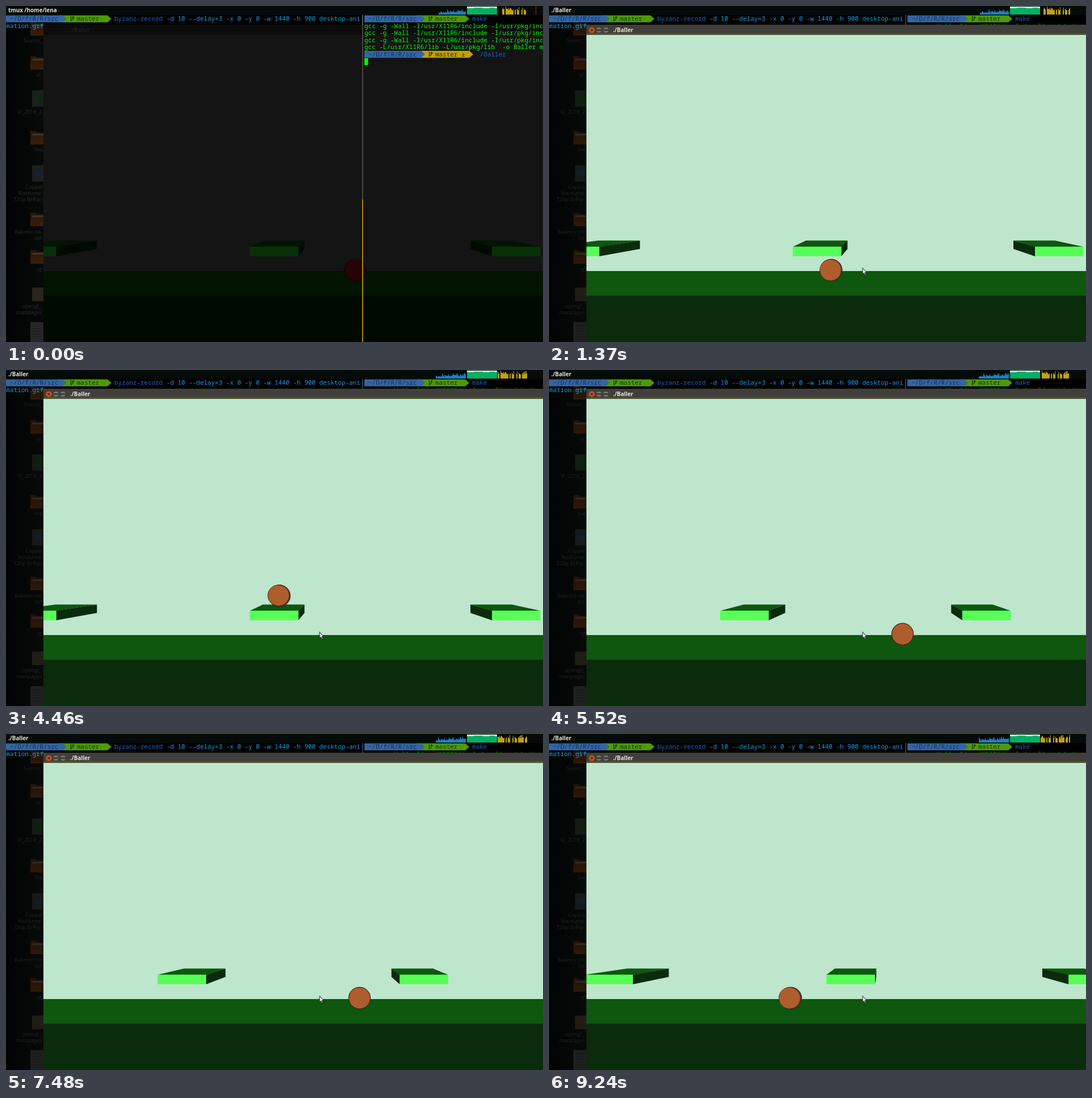
An HTML page that plays this animation: 947x592 px, repeating every 9.32 s.

```html
<!DOCTYPE html>
<html lang="en">
<head>
<meta charset="utf-8">
<title>Baller</title>
<style>
html, body { margin: 0; width: 100%; height: 100%; overflow: hidden; background: #000; }
svg { display: block; width: 100vw; height: 100vh; }
text { white-space: pre; }
.mono { font: 10.96px "Noto Sans Mono", "DejaVu Sans Mono", monospace; }
.ui { font: bold 9.8px "Open Sans", "Noto Sans", sans-serif; fill: #e6e3d8; }
.icons text { font: 9.4px "Open Sans", "Noto Sans", sans-serif; fill: #2c2c2c; }
.gcc { fill: #00ff00; }
.cmd { fill: #1668cc; }
.arg { fill: #12a0e6; }
.seg { fill: #11304f; }
.seg.b { fill: #16340a; }
#root {
  --sky: #bde6cc; --bar: #403f3b; --strip: #50552a; --label: #e6e3d8;
  --top: #0f560f; --low: #0a2b0c; --front: #55ff55;
  --ball: #ae5e2c; --rim: #54352f; --edge: #3a1f1c;
}
#root.dark {
  --sky: #141414; --bar: #0c0c0c; --strip: #0e0e0d; --label: #1d1d1d;
  --top: #021402; --low: #010a01; --front: #083008;
  --ball: #260404; --rim: #180303; --edge: #120202;
}
.sky { fill: var(--sky); } .top { fill: var(--top); } .low { fill: var(--low); } .front { fill: var(--front); }
</style>
</head>
<body>
<svg id="root" viewBox="0 0 947 592" preserveAspectRatio="none">
  <defs>
    <clipPath id="side"><rect y="28" width="66" height="564"/></clipPath>
    <clipPath id="sliver"><rect x="684" y="28" width="258" height="5"/></clipPath>
    <clipPath id="view"><rect x="66" y="51" width="881" height="541"/></clipPath>
    <linearGradient id="desk"><stop stop-color="#020403"/><stop offset="1" stop-color="#070a08"/></linearGradient>
    <linearGradient id="folder" x2="0" y2="1"><stop stop-color="#2a1608"/><stop offset="1" stop-color="#3c1e0a"/></linearGradient>
  </defs>
  <rect width="947" height="592" fill="#000"/>
  <rect width="947" height="16" fill="#050b08"/>
  <rect y="30" width="66" height="562" fill="url(#desk)"/>

  <g class="icons" id="icons" clip-path="url(#side)"></g>
  <text id="title" class="ui" x="4" y="11"></text>
  <g id="meters" shape-rendering="crispEdges">
    <path id="cpu" fill="#1d7fc4"/>
    <rect x="813" y="1" width="53" height="14" fill="#00b064"/>
    <path d="M813 1h53v3h-4v-1h-9v1h-12v-1h-16v1h-12z" fill="#c9efd8"/>
    <path id="net" fill="#c4a010"/>
    <rect id="disk" x="934" y="0" width="1" height="15" fill="#7a2c10"/>
  </g>

  <g id="prompts"></g>
  <g class="mono">
    <text class="cmd" x="191" y="26">byzanz-record<tspan class="arg"> -d 10 --delay=3 -x 0 -y 0 -w 1440 -h 900 desktop-ani</tspan></text>
    <text class="cmd" x="822" y="26">make</text>
    <text class="arg" x="0.5" y="38.5">mation.gif</text>
    <text id="peek" class="gcc" x="632" y="38.5" opacity=".5" clip-path="url(#sliver)">gcc -g -Wall -I/usr/X11R6/include -I/usr/pkg/include</text>
  </g>
  <rect x="628.5" y="16" width="1" height="17" fill="#777"/>

  <rect x="66" y="33" width="881" height="15" style="fill:var(--bar)"/>
  <rect x="66" y="48" width="881" height="3" style="fill:var(--strip)"/>
  <g id="buttons">
    <circle cx="75.5" cy="42.5" r="5" fill="#d0541f"/>
    <path d="M73.5 40.5l4 4m0-4l-4 4" stroke="#4a2414" stroke-width="1.3"/>
    <g fill="#77766a"><circle cx="88" cy="42.5" r="4.6"/><circle cx="100.5" cy="42.5" r="4.6"/></g>
    <path d="M83.5 42.5h9m3.5 0h9" stroke="#33322e" stroke-width="2.4"/>
  </g>
  <text class="ui" x="113" y="46" style="fill:var(--label)">./Baller</text>

  <g clip-path="url(#view)">
    <rect class="sky" x="66" y="51" width="881" height="541"/>
    <rect class="top" x="66" y="467" width="881" height="44"/>
    <rect class="low" x="66" y="510.5" width="881" height="82"/>
    <g id="switcher">
      <rect x="424" y="289.5" width="414.5" height="141.5" rx="5" fill="#434343"/>
      <g class="sky">
        <rect x="458" y="306.5" width="97" height="97.5" rx="6"/>
        <rect x="583" y="306.5" width="97" height="97.5" rx="6"/>
        <rect x="693" y="292" width="126" height="126" rx="19" stroke="#6fae7c"/>
      </g>
      <path d="M598.5 381v2.5h66V381" fill="none" stroke="#4a5a50"/>
      <path d="M625.5 290v16m4 0v-16m4 0v16" stroke="#8fd0c0" stroke-width="1.6"/>
      <path d="M624 431v-23q0-4 3-4h5q3 0 3 4v23z" fill="#4a9a48"/>
      <rect x="626" y="404" width="7" height="27" fill="#c4a010"/>
      <text class="ui" x="741" y="423" style="font-size:8.3px">./Baller</text>
    </g>
    <path id="sides" class="low"/>
    <path id="tops" class="top"/>
    <path id="fronts" class="front"/>
    <path id="streaks" d="M430 430.5h86m-86 4h86" stroke="#168a16" stroke-width="1.5"/>
    <circle id="back" r="19.3" style="fill:var(--rim);stroke:var(--edge)" stroke-width=".8"/>
    <ellipse id="face" style="fill:var(--ball);stroke:var(--edge)" stroke-width=".8"/>
  </g>

  <g id="term" class="mono">
    <rect x="628.5" y="16" width="1" height="325" fill="#777"/>
    <rect x="628" y="341" width="1.6" height="251" fill="#c4a000"/>
    <g id="build" class="gcc"></g>
    <g id="prompt2"></g>
    <text class="cmd" x="829" y="88.5">./Baller</text>
    <rect x="632" y="92" width="6.5" height="12" fill="#00ff00"/>
  </g>
  <path id="pointer" d="M553 461.5v11l2.4-2.2 1.9 4 1.7-.8-1.8-3.8h3z" fill="#e8efe9" stroke="#111" stroke-width=".9"/>
</svg>
<script>
const $ = id => document.getElementById(id);
const set = (id, attrs) => { for (const k in attrs) $(id).setAttribute(k, attrs[k]); };
const show = (id, on) => { $(id).style.display = on ? '' : 'none'; };
const clamp = (v, lo, hi) => Math.max(lo, Math.min(hi, v));
const rnd = i => { const v = Math.sin(i * 12.9898 + 4.1) * 43758.5453; return v - Math.floor(v); };

// Shell prompt: path arrow followed by a branch arrow.
function prompt(x, y, color, branch, width) {
  const arrow = (a, b, fill) =>
    `<path d="M${a} ${y}H${b}l7 6-7 6.3H${a}z" fill="${fill}"/>`;
  const bx = x + 116;
  return `<g class="mono">${arrow(x + 93, x + width, color)}${arrow(x, x + 100, '#3465a4')}
    <path d="M${bx - 1.5} ${y + 10.5}v-9m0 7q4 0 4-5m-2 1l2-2 2 2" fill="none" stroke="#16340a" stroke-width="1.3"/>
    <text class="seg" x="${x + 7}" y="${y + 9.6}">~/D/f/R/R/src</text>
    <text class="seg b" x="${x + 125}" y="${y + 9.6}">${branch}</text></g>`;
}
$('prompts').innerHTML = prompt(0, 16.4, '#4e9a06', 'master', 179) + prompt(632, 16.4, '#4e9a06', 'master', 178);
$('prompt2').innerHTML = prompt(632, 79, '#c4a000', 'master ±', 185);

const compile = 'gcc -g -Wall -I/usr/X11R6/include -I/usr/pkg/include';
$('build').innerHTML = [compile, compile, compile, 'gcc -L/usr/X11R6/lib -L/usr/pkg/lib  -o Baller main.o']
  .map((s, i) => `<text x="632" y="${38.5 + 12.5 * i}">${s}</text>`).join('');

const folder = y => `<path d="M43 ${y - 12}h9l3 3h14v21H43z" fill="url(#folder)"/><path d="M46 ${y - 7}h20v3H46z" fill="#3a3632"/>`;
const sheet = (y, h, fill) => `<rect x="46" y="${y - h / 2}" width="24" height="${h}" fill="${fill}"/>`;
const labels = [
  ['Snimci_', 31, 64], ['vi', 54, 125], ['VI_2018_2', 20, 190], ['live', 50, 256],
  ['Copper', 34, 322], ['Nocturne', 21, 333], ['720p BrRip S', 13, 344],
  ['Bakreni no', 15, 401], ['titl', 51, 412], ['rg', 54, 467], ['opengl_', 28, 532], ['manpages', 18, 543]
];
$('icons').innerHTML = [40, 100, 232, 376, 442].map(folder).join('') +
  sheet(163, 29, '#1a211a') + '<rect x="52" y="157" width="12" height="13" fill="#0d2a10"/>' +
  sheet(295, 29, '#1d1f20') + '<circle cx="57" cy="295" r="6" fill="#12243a"/>' +
  sheet(508, 24, '#2a241a') +
  '<rect x="43" y="557" width="26" height="35" fill="#272727"/>' +
  '<path d="M47 563h16m-16 5h14m-14 5h16m-16 5h12m-12 5h16" stroke="#1a1a1a"/>' +
  labels.map(([s, x, y]) => `<text x="${x}" y="${y}">${s}</text>`).join('');

const LOOP = 9320, JUMP = 17.05, TOP = 212, LEDGE = 67.4;
const tickAt = t => Math.floor((t - 3424) / 60.52);
const jump = (k, start) => {
  const d = k - start;
  return Math.max(0, 4 * TOP * d * (JUMP - d) / JUMP ** 2);
};
const steps = (t, start, gap, n) => clamp(Math.floor((t - start + 4) / gap) + 1, 0, n);

function height(k) {
  if (k < 17) return jump(k, 1);
  if (k <= 21) return LEDGE;
  if (k < 46) return Math.max(0, LEDGE - 2.92 * (k - 21) ** 2);
  return jump(k, 46) + jump(k, 67);
}

function world(t) {
  const k = tickAt(t);
  if (k < 0) {
    const moves = -steps(t, 990, 63.3, 7) + steps(t, 2390, 60, 2) - steps(t, 2770, 60, 2);
    return { x: 615.5 + 17 * moves, y: 465.3, scroll: 0 };
  }
  const n = clamp(k - 18, 0, 26) + clamp(k - 50, 0, 29);
  return {
    x: Math.min(623.5, 480.6 + 16.82 * n) - 16.6 * clamp(k - 84, 0, 12),
    y: 465.3 - height(k),
    scroll: Math.max(0, 17.09 * n - 145.3)
  };
}

function drawPlatforms(scroll) {
  const far = x => (0.857 * x + 84.6).toFixed(1);
  let sides = '', tops = '', fronts = '';
  for (let i = -1; i <= 2; i++) {
    const a = 430 - scroll % 427 + 427 * i, b = a + 85.5;
    const near = b < 592 ? b : a;
    if (b < 592 || a > 592) sides += `M${near} 424L${far(near)} 413.3V428L${near} 441z`;
    tops += `M${a} 424.3L${far(a)} 413.3H${far(b)}L${b} 424.3z`;
    fronts += `M${a} 424H${b}V441H${a}z`;
  }
  set('sides', { d: sides });
  set('tops', { d: tops });
  set('fronts', { d: fronts });
}

function drawBall(x, y) {
  const rise = (465.3 - y) / 152;
  set('back', { cx: x + (623 - x) * 0.0105, cy: y });
  set('face', { cx: x, cy: y - 1.5 * rise, rx: 18.9, ry: Math.max(16.5, 18.9 - 1.4 * rise) });
}

function drawMeters(t) {
  const n = Math.floor((t + 100) / 465);
  let cpu = '', net = '';
  for (let x = 758; x < 811; x++) {
    const i = x - 759 + n;
    if (i < 4) continue;
    const h = Math.round(2 + 3 * rnd(i) + (rnd(i + 300) > 0.7 ? 5 * rnd(i + 90) : 0) + i / 25);
    cpu += `M${x} 15v-${h}h1v${h}z`;
  }
  for (let x = 867; x < 919; x++) {
    const i = x - 759 + n;
    if (i < 116 || rnd(Math.floor(i / 2)) < 0.35) continue;
    const h = Math.round(7 + 7 * rnd(i + 50));
    net += `M${x} 15v-${h}h1v${h}z`;
  }
  set('cpu', { d: cpu });
  set('net', { d: net });
  show('disk', t < 160);
}

function draw(t) {
  const dark = t < 230, w = world(t);
  $('root').classList.toggle('dark', dark);
  $('title').textContent = t < 390 ? 'tmux /home/lena' : './Baller';
  show('term', dark);
  show('buttons', !dark);
  show('peek', !dark);
  show('switcher', t >= 160 && t < 390);
  show('streaks', !dark && t < 390);
  show('pointer', !dark);
  $('icons').setAttribute('opacity', dark ? 1 : 0.75);
  drawMeters(t);
  drawPlatforms(w.scroll);
  drawBall(w.x, w.y);
}

const began = performance.now();
function loop() {
  draw((performance.now() - began) % LOOP);
  requestAnimationFrame(loop);
}
loop();
</script>
</body>
</html>
```
